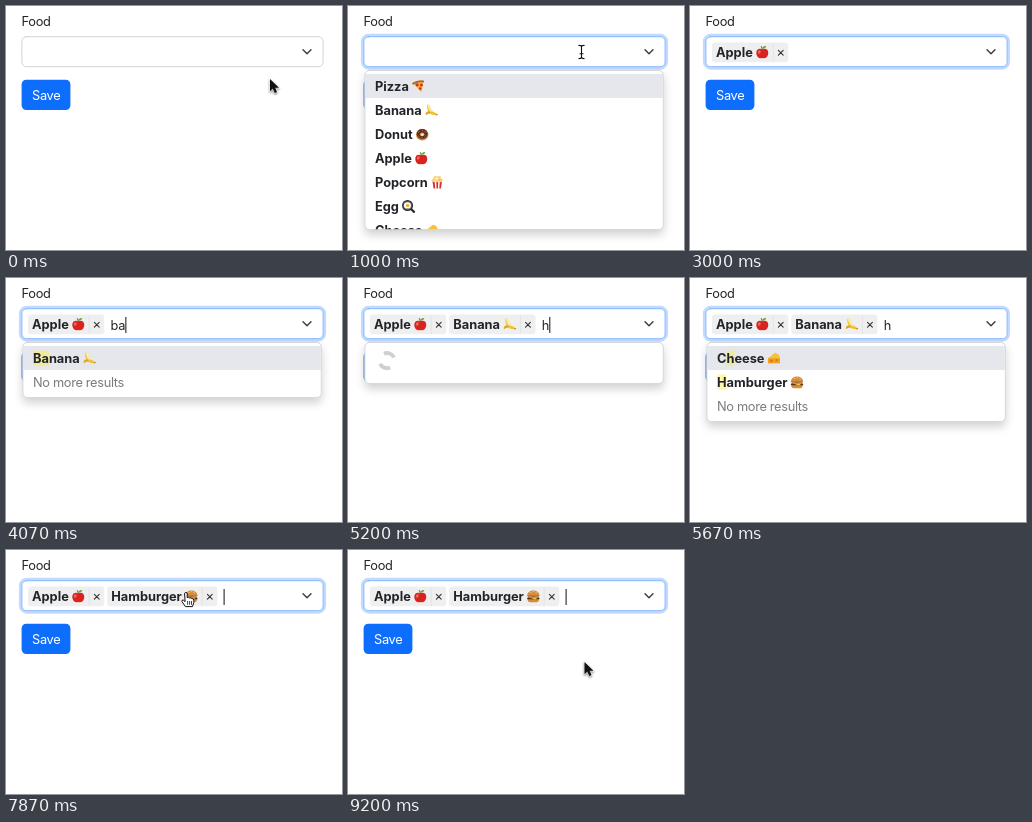
An HTML page with a canvas for the animation above (9.53 s loop, 336x244 px).

```html
<!DOCTYPE html>
<html lang="en">
<head>
<meta charset="utf-8">
<title>Food autocomplete</title>
<style>
html, body { margin: 0; width: 100%; height: 100%; overflow: hidden; background: #fff; }
canvas { display: block; width: 336px; height: 244px; }
</style>
</head>
<body>
<canvas id="stage"></canvas>
<script>
const W = 336, H = 244, LOOP = 9530, STEP = 1000 / 15;
const canvas = document.getElementById('stage');
const ctx = canvas.getContext('2d');
const INK = '#212529', ROW = 24, MENU_X = 17, MENU_Y = 64, MENU_W = 299, MENU_MAX = 160;
const FOODS = ['Pizza', 'Banana', 'Donut', 'Apple', 'Popcorn', 'Egg', 'Cheese'];
const BLINKS = [470, 1000, 1470, 2000, 2470, 3000, 3400, 4130, 4600, 5670, 6200, 7070, 7600, 8670, 9200];

const clamp = v => Math.max(0, Math.min(1, v));
const ease = v => { v = clamp(v); return v * v * (3 - 2 * v); };
const mix = (a, b, k) => a + (b - a) * k;

// Value of the last [time, value] pair already reached
const at = (t, list) => list.reduce((v, [start, next]) => t >= start ? next : v, null);

function box(x, y, w, h, r, fill, stroke) {
  ctx.beginPath();
  ctx.roundRect(x, y, w, h, r);
  if (fill) { ctx.fillStyle = fill; ctx.fill(); }
  if (stroke) { ctx.strokeStyle = stroke; ctx.stroke(); }
}

function setFont(bold) {
  ctx.font = `${bold ? 700 : 400} 12.8px Inter, "Open Sans", sans-serif`;
  ctx.letterSpacing = bold ? '0px' : '-0.33px';
}

function text(s, x, y, color = INK, bold = false) {
  setFont(bold);
  ctx.fillStyle = color;
  ctx.fillText(s, x, y);
}

function width(s, bold) {
  setFont(bold);
  return ctx.measureText(s).width;
}

function dot(color, x, y, rx, ry = rx, turn = 0) {
  ctx.beginPath();
  ctx.ellipse(x, y, rx, ry, turn, 0, 7);
  ctx.fillStyle = color;
  ctx.fill();
}

function shape(color, path) {
  ctx.fillStyle = color;
  ctx.fill(new Path2D(path));
}

function line(color, size, path) {
  ctx.strokeStyle = color;
  ctx.lineWidth = size;
  ctx.lineCap = ctx.lineJoin = 'round';
  ctx.stroke(new Path2D(path));
  ctx.lineWidth = 1;
}

// Food icons, drawn around their centre in a 13 px square
const icons = {
  Pizza() {
    shape('#f5b53c', 'M-5 -3Q0 -6 5 -4L3 6Z');
    line('#b4662a', 2, 'M-5.2 -2.6Q-1 -5.6 4.8 -4.8');
    dot('#d2301f', -1.2, -1.4, 1.6);
    dot('#d2301f', 3, -1.2, 1.5);
    dot('#d2301f', 1.8, 2.4, 1.4);
  },
  Banana() {
    shape('#f2c230', 'M-4 -5.5C-5 0 -1 6 6 5C6.5 3.6 5 3 3.5 2.2C0 1 -1.6 -2 -2.4 -5.5Z');
    shape('#fbe9a8', 'M-3.6 -5.5Q-1.4 -6.4 -.6 -4Q0 -1 2 1.4L0 1.6Q-3.4 -1 -3.6 -5.5Z');
    shape('#e0a51f', 'M-2 1Q-6 1 -5.6 5Q-3 2.8 0 3.4Z');
    line('#8a6a1e', 1, 'M5.4 4.6L6 4.4');
  },
  Donut() {
    dot('#c98a4b', 0, .4, 6.2, 5.8);
    dot('#5b2d1c', 0, -.2, 5.5, 5);
    dot('#d9a066', 0, .2, 2.3, 1.8);
    dot('#fff', 0, .5, 1.3, .9);
    line('#f4c04d', .8, 'M-3.6 -2L-3 -2.6M3 -2.6L3.6 -2M-3.5 2L-3 2.5');
    line('#e86a8a', .8, 'M0 -4L.6 -3.8M3.4 1.6L3 2.2M0 3.5L-.6 3.4');
  },
  Apple() {
    shape('#d8231f', 'M0 -2.6C-2.5 -4.4 -6.2 -3 -6 1C-5.8 4.6 -3 6.8 0 5.8C3 6.8 5.8 4.6 6 1C6.2 -3 2.5 -4.4 0 -2.6Z');
    dot('#f2685c', -3, -.2, 1.3, 1.8, .4);
    line('#6b4423', 1, 'M0 -2.6Q.1 -4.4 -.8 -5.6');
    shape('#5fa832', 'M0 -3.4Q.6 -6.6 4 -6.2Q3.4 -3.4 0 -3.4Z');
  },
  Popcorn() {
    shape('#fff', 'M-4.6 -1H4.6L3.6 6.2H-3.6Z');
    shape('#d93030', 'M-4.8 -1H-2.6L-2 6.2H-3.7ZM-1 -1H1L.8 6.2H-.8ZM2.6 -1H4.8L3.7 6.2H2Z');
    [[-3.4, -2], [0, -2], [3.4, -2], [-1.8, -4.4], [1.8, -4.4]].forEach(p => dot('#f3d68a', ...p, 2));
    dot('#fff3cf', -.6, -3.6, 1.2);
    dot('#d9a650', 2.6, -2.4, .8);
  },
  Egg() {
    line('#2b2b2d', 2.2, 'M2.6 3L5.6 5.6');
    dot('#2b2b2d', -.9, -.7, 5.5);
    dot('#58595c', -.9, -.7, 4.5);
    dot('#fff', -1, -.8, 3.5, 3.2);
    dot('#f5ae22', -.8, -.8, 1.7);
  },
  Cheese() {
    shape('#f7c23a', 'M-6 0L1 -5.4Q5.6 -4.6 6 0V5H-6Z');
    shape('#f09f22', 'M-6 0H6V5H-6Z');
    dot('#cf7d16', -2.6, 2.6, 1.4);
    dot('#cf7d16', 2.6, 2, 1.1);
  },
  Hamburger() {
    shape('#d98b3a', 'M-6 -1C-6 -7.4 6 -7.4 6 -1Z');
    shape('#d98b3a', 'M-5.8 3.4H5.8Q5.6 6 3.4 6H-3.4Q-5.6 6 -5.8 3.4Z');
    shape('#62a83a', 'M-6.3 -1.2H6.3L5.6 .4L3 .2L0 1L-3 .2L-5.6 .4Z');
    line('#d8402c', 1, 'M-5 .8H5');
    line('#5e2f1b', 2, 'M-5.2 2.4H5.2');
    shape('#f6c740', 'M-4 1.2H4.6L2 3.2Z');
    line('#f5dcae', .7, 'M-2.6 -3.6H-2M0 -4.6H.6M2.6 -3.4H3.2');
  }
};

function food(name, x, y) {
  text(name, x, y + 4.6, INK, true);
  const end = x + width(name, true) + 3;
  ctx.save();
  ctx.translate(end + 6.5, y + .2);
  icons[name]();
  ctx.restore();
  return end + 13;
}

function tag(name, x) {
  const split = x + 4 + width(name, true) + 3 + 13 + 4;
  box(x, 36.6, split + 15.5 - x, 19.6, 3, '#efefef');
  food(name, x + 4, 46);
  ctx.fillStyle = '#e2e2e2';
  ctx.fillRect(split, 37, .8, 19);
  const cx = split + 8, cy = 46.8, r = 2.4;
  line('#333', 1.1, `M${cx - r} ${cy - r}l${2 * r} ${2 * r}m0 ${-2 * r}l${-2 * r} ${2 * r}`);
  return split + 15.5;
}

function control(t, tags, query) {
  const wrap = tags.length > 2, h = wrap ? 49.8 : 30.2, k = clamp((t - 470) / 150);
  if (k) {
    ctx.lineWidth = 3;
    box(14.4, 29.2, 304.2, h + 2.8, 6.5, null, `rgba(13,110,253,${.25 * k})`);
    ctx.lineWidth = 1;
  }
  const border = [[206, 134], [212, 183], [218, 254]].map(([a, b]) => mix(a, b, k));
  box(15.9, 30.7, 301.2, h - .2, 4.6, '#fff', `rgb(${border})`);
  line('#343a40', 1.4, `M297 ${28.7 + h / 2}l4 4l4 -4`);

  let end = 19;
  for (const name of tags) end = tag(name, end + 3);
  const x = tags.length && !wrap ? end + 6.3 : 25, y = wrap ? 68.5 : 47;
  let caret = x;
  if (query) {
    text(query, x, y + 4.6);
    caret += width(query, false) + .3;
  }
  if (BLINKS.filter(b => t >= b).length % 2) {
    ctx.fillStyle = '#111';
    ctx.fillRect(caret, y - 8, 1, 16);
  }
}

function saveButton(y) {
  box(15.6, y, 48.8, 30.4, 4.8, '#0d6efd');
  text('Save', 26, y + 20, '#fff');
}

function spinner(angle) {
  ctx.lineWidth = 4;
  ctx.lineCap = 'butt';
  ctx.strokeStyle = '#d0d0d0';
  for (const mid of [-.5, .5]) {
    const a = angle + mid * Math.PI;
    ctx.beginPath();
    ctx.arc(39, 82.6, 7.6, a - Math.PI / 4, a + Math.PI / 4);
    ctx.stroke();
  }
  ctx.lineWidth = 1;
}

function menuAt(t) {
  if (t >= 470 && t < 930) return { load: 470, items: [] };
  if (t >= 930 && t < 2200) return { items: FOODS, active: at(t, [[0, 0], [1470, 1], [1670, 2], [1870, 3]]) };
  if (t >= 3400 && t < 4070) return { load: 3400, items: FOODS.filter(f => f !== 'Apple'), active: 0 };
  if (t >= 4070 && t < 4670) return { items: ['Banana'], active: 0, end: true };
  if (t >= 5130 && t < 5600) return { load: 5130, items: [] };
  if (t >= 5600 && t < 6530) return { items: ['Cheese', 'Hamburger'], active: t < 6070 ? 0 : 1, end: true };
}

function menu(m, now, query) {
  const top = m.load ? 102 : 68;
  const rows = m.items.length + (m.end ? 1 : 0);
  const h = Math.min(MENU_MAX, top + rows * ROW + 4 - MENU_Y);
  ctx.save();
  ctx.shadowColor = 'rgba(0,0,0,.19)';
  ctx.shadowBlur = 10 * scale;
  ctx.shadowOffsetY = 4.8 * scale;
  box(MENU_X - .3, MENU_Y, MENU_W, h, 4.8, '#fff');
  ctx.restore();
  box(MENU_X - .1, MENU_Y + .4, MENU_W - .6, h - .8, 4.6, '#fff', '#d3d5d8');

  ctx.save();
  ctx.beginPath();
  ctx.rect(MENU_X + .4, MENU_Y + .8, MENU_W - 1.6, h - 1.6);
  ctx.clip();
  if (m.load) spinner((now - m.load) / 1200 * Math.PI * 2);
  m.items.forEach((name, i) => {
    const y = top + i * ROW;
    if (i === m.active) {
      ctx.fillStyle = '#e5e7ec';
      ctx.fillRect(MENU_X, y, MENU_W, ROW);
    }
    const hit = query ? name.toLowerCase().indexOf(query) : -1;
    if (hit >= 0) {
      const x = 27 + width(name.slice(0, hit), true);
      box(x, y + 4.5, width(name.substr(hit, query.length), true), 15.5, 1, 'rgba(255,237,40,.4)');
    }
    food(name, 27, y + 12);
  });
  if (m.end) text('No more results', 27, top + m.items.length * ROW + 16.6, '#7b7b7b');
  ctx.restore();
}

const cursors = {
  arrow() {
    const path = 'M0 0V12.2L2.8 9.6L4.8 14L7 13L5.1 8.8H9Z';
    line('#fff', 1.8, path);
    shape('#111', path);
  },
  beam() {
    const path = 'M-2.6 -6.6Q0 -6.6 0 -5V5Q0 6.6 -2.6 6.6M2.6 -6.6Q0 -6.6 0 -5M0 5Q0 6.6 2.6 6.6M-1.5 1.8H1.5';
    line('#fff', 2.4, path);
    line('#111', 1.1, path);
  },
  hand() {
    const path = 'M-1.2 0Q0 -1.4 1.2 0V4.6Q2.6 3.8 3.6 5Q5 4.3 5.9 5.6Q7.8 5.2 7.8 7.2V9.6L6.4 13.6H-.6L-4 8.6Q-4.4 6.6 -2.8 7L-1.2 8.4Z';
    shape('#fff', path);
    line('#111', 1, path);
    line('#111', .8, 'M1.6 8.4V11.4M3.6 8.4V11.4M5.5 8.4V11.4');
  }
};

function pointerAt(t, now) {
  if (t < 1470) {
    const k = ease(now / 333), y = mix(73, 46, k);
    return [y < 60 ? 'beam' : 'arrow', mix(264, 233.5, k), y];
  }
  if (t < 7070) return null;
  if (t < 8000) return ['hand', mix(237, 180, ease((now - 7000) / 733)), 43];
  const k = ease((now - 8000) / 400), x = mix(180, 236.5, k), y = mix(43, 112, k);
  return [y < 57 && x < 212 ? 'hand' : y < 61 ? 'beam' : 'arrow', x, y];
}

function pointer(p) {
  if (!p) return;
  const [kind, x, y] = p;
  ctx.save();
  ctx.translate(x, y);
  if (kind === 'arrow') {
    ctx.shadowColor = 'rgba(0,0,0,.35)';
    ctx.shadowBlur = 2 * scale;
    ctx.shadowOffsetY = scale;
  }
  cursors[kind]();
  ctx.restore();
}

function draw(t) {
  const now = Math.floor((t + 4) / STEP) * STEP;
  const tags = at(t, [[0, []], [2200, ['Apple']], [4670, ['Apple', 'Banana']],
    [6530, ['Apple', 'Banana', 'Hamburger']], [7870, ['Apple', 'Hamburger']]]);
  const query = at(t, [[0, ''], [3400, 'b'], [3600, 'ba'], [4670, ''], [5130, 'h'], [6530, '']]);
  ctx.setTransform(scale, 0, 0, scale, 0, 0);
  ctx.fillStyle = '#fff';
  ctx.fillRect(0, 0, W, H);
  text('Food', 15.6, 19.6);
  saveButton(tags.length > 2 ? 93 : 73.7);
  control(t, tags, query);
  const m = menuAt(t);
  if (m) menu(m, now, query);
  pointer(pointerAt(t, now));
}

const scale = window.devicePixelRatio || 1;
canvas.width = W * scale;
canvas.height = H * scale;
const start = performance.now();
function tick() {
  draw((performance.now() - start) % LOOP);
  requestAnimationFrame(tick);
}
tick();
</script>
</body>
</html>
```
